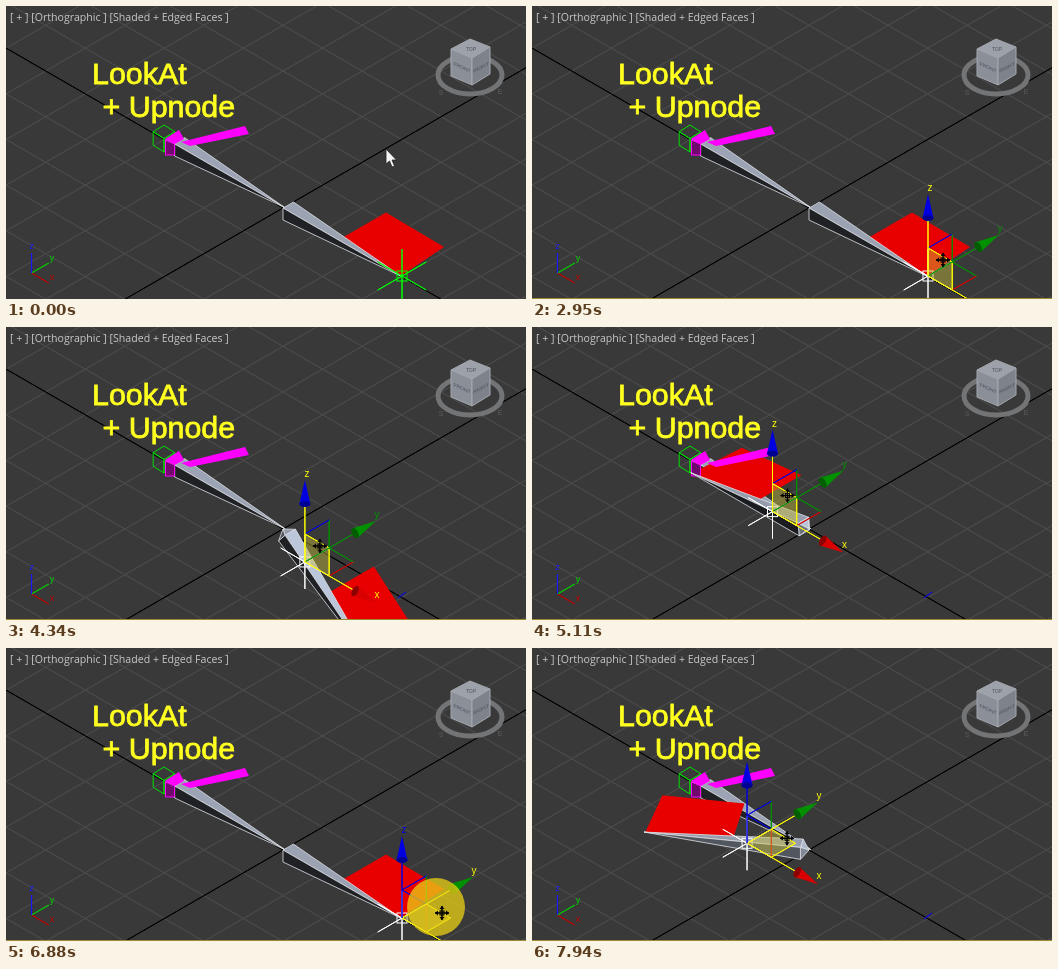
Write an HTML page with a canvas that moves like this. It is 520 px wide and 293 px high and loops after 8000 ms.

```html
<!DOCTYPE html>
<html lang="en">
<head>
<meta charset="utf-8">
<title>LookAt + Upnode</title>
<style>
html, body { margin: 0; width: 100%; height: 100%; overflow: hidden; background: #393939; }
canvas { display: block; }
</style>
</head>
<body>
<canvas id="view" width="520" height="293"></canvas>
<script>
const c = document.getElementById('view').getContext('2d');
const LOOP = 8000, LEN = 137, COS = Math.sqrt(3) / 2;
const ORIGIN = [277, 202], HOME = [396, 270];
const YELLOW = '#ff0', AXIS = { x: '#d80000', y: '#009000', z: '#0000e0' };

const ease = (t, from, to) => {
  const s = Math.min(1, Math.max(0, (t - from) / (to - from)));
  return s * s * (3 - 2 * s);
};
const lerp = (a, b, s) => a.map((k, i) => k + (b[i] - k) * s);
const shift = ([x, y], dx, dy) => [x + dx, y + dy];

// Isometric projection of a world vector placed at a screen point.
const iso = ([ox, oy], [x, y, z]) => [ox + (x + y) * COS, oy + (x - y) / 2 - z];
const sub = (a, b) => a.map((k, i) => k - b[i]);
const unit = v => { const m = Math.hypot(...v) || 1; return v.map(k => k / m); };
const cross = (a, b) => [a[1] * b[2] - a[2] * b[1], a[2] * b[0] - a[0] * b[2], a[0] * b[1] - a[1] * b[0]];
const mix = (f, u, v, w) => [0, 1, 2].map(k => f[0][k] * u + f[1][k] * v + f[2][k] * w);

function poly(pts, fill, stroke, width = 1) {
  c.beginPath();
  pts.forEach(p => c.lineTo(...p));
  c.closePath();
  if (fill) { c.fillStyle = fill; c.fill(); }
  if (stroke) { c.strokeStyle = stroke; c.lineWidth = width; c.stroke(); }
}
const line = (a, b, color, width) => poly([a, b], null, color, width);

function text(s, x, y, size, color, align = 'center', family = '"Liberation Sans", Arial') {
  c.font = `${size}px ${family}, sans-serif`;
  c.textAlign = align;
  c.fillStyle = color;
  c.fillText(s, x, y);
}

function title(s, x, y) {
  text(s, x, y, 30.4, '#ffff20', 'left');
  c.strokeStyle = '#ffff20';
  c.lineWidth = .8;
  c.strokeText(s, x, y);
}

function grid() {
  c.fillStyle = '#393939';
  c.fillRect(0, 0, 520, 293);
  const far = 700;
  const pair = (k, color) => {
    line(iso(ORIGIN, [-far, k, 0]), iso(ORIGIN, [far, k, 0]), color);
    line(iso(ORIGIN, [k, -far, 0]), iso(ORIGIN, [k, far, 0]), color);
  };
  for (let i = -12; i <= 12; i++) if (i) pair(i * LEN / 3, '#4a4a4a');
  pair(0, '#000');
}

// Axes of a bone: along, sideways (kept towards world Y), across.
function frame(dir) {
  const d = unit(dir), k = d[1];
  const side = unit([-d[0] * k, 1 - k * k, -d[2] * k]);
  return [d, side, cross(d, side)];
}

function bone(root, f, start) {
  const ring = [[-6, -6], [6, -6], [6, 6], [-6, 6]].map(([v, w]) => mix(f, start, v, w));
  for (const end of [0, LEN]) ring.forEach((p, i) => {
    const q = ring[(i + 1) % 4], apex = mix(f, end, 0, 0);
    let n = unit(cross(sub(q, p), sub(apex, p)));
    if (!end) n = n.map(k => -k);
    if (n[0] - n[1] + n[2] <= 0) return;
    const g = 28 + 130 * Math.max(0, n[2]) + 110 * Math.max(0, n[0]);
    poly([p, q, apex].map(v => iso(root, v)), `rgb(${g * .95},${g},${g * 1.1})`, '#dfe3e8', .8);
  });
}

function upPlane(f) {
  poly([[64, 0], [64, 55], [132, 54], [136, 0]].map(([u, v]) => iso(ORIGIN, mix(f, u, v, 0))), '#e80000');
}

function wireBox() {
  const hex = [...Array(6)].map((_, i) => [
    158 + 12.5 * Math.sin(i * Math.PI / 3), 132.5 - 13.5 * Math.cos(i * Math.PI / 3)]);
  poly(hex, null, '#00e000');
  [1, 3, 5].forEach(i => line(hex[i], [158, 132.5], '#00e000'));
}

function upNode() {
  poly([[175, 136], [239, 120], [243, 128], [184, 140]], '#f0f');
  poly([[159, 133], [173, 124], [178, 133], [169, 138]], '#f0f');
  poly([[159.5, 134], [168.5, 138], [168.5, 149], [159.5, 149]], '#70086e', '#f0f');
}

function helper(g, color) {
  for (const v of [[28, 0, 0], [0, 28, 0], [0, 0, 27]])
    line(iso(g, v), iso(g, v.map(k => -k)), color);
  c.strokeRect(g[0] - 5, g[1] - 5, 10, 10);
}

function cone(g, dir, color) {
  const tip = iso(g, dir.map(k => k * 82)), base = iso(g, dir.map(k => k * 58));
  const dx = (tip[0] - base[0]) / 24, dy = (tip[1] - base[1]) / 24;
  poly([tip, shift(base, -dy * 5.5, dx * 5.5), shift(base, dy * 5.5, -dx * 5.5)], color);
  c.beginPath();
  c.ellipse(...base, 3, 5.5, Math.atan2(dy, dx), 0, 7);
  c.fill();
  c.fillStyle = 'rgba(0,0,0,.35)';
  c.fill();
}

function gizmo(g, hot) {
  const S = 28, dirs = { x: [1, 0, 0], y: [0, 1, 0], z: [0, 0, 1] };
  const labels = { x: [72, 36], y: [72, -44], z: [2, -85] };
  for (const [a, b] of ['yz', 'xz', 'xy']) {
    const on = hot === a + b;
    const pa = iso(g, dirs[a].map(k => k * S)), pb = iso(g, dirs[b].map(k => k * S));
    const far = iso(pa, dirs[b].map(k => k * S));
    if (on) poly([g, pa, far, pb], 'rgba(200,190,60,.45)');
    line(pa, far, on ? YELLOW : AXIS[a]);
    line(pb, far, on ? YELLOW : AXIS[b]);
  }
  for (const k of 'yxz') {
    const color = hot.includes(k) ? YELLOW : AXIS[k];
    line(g, iso(g, dirs[k].map(v => v * 60)), color);
    cone(g, dirs[k], AXIS[k]);
    text(k, ...shift(g, ...labels[k]), 10, color);
  }
}

function viewCube() {
  c.strokeStyle = '#737476';
  c.lineWidth = 5;
  c.beginPath();
  c.ellipse(464, 69, 32, 19, 0, 0, 7);
  c.stroke();
  const top = [[445, 43], [464, 33], [484, 41], [466, 52]], [left, , right, front] = top;
  const side = (a, b, color) => poly([a, b, shift(b, 0, 27), shift(a, 0, 27)], color, '#a4a8ae');
  poly(top, '#9da1a9', '#a4a8ae');
  side(left, front, '#8a8f98');
  side(front, right, '#7d828b');
  const face = (s, x, y, skew) => {
    c.save();
    c.transform(1, skew, 0, 1, x, y);
    text(s, 0, 0, 5, '#4c5058');
    c.restore();
  };
  face('TOP', 465, 45, 0);
  face('FRONT', 456, 63, .45);
  face('RIGHT', 475, 63, -.5);
  text('S', 435, 89, 7, '#5c5c5c');
  text('E', 494, 88, 7, '#5c5c5c');
}

function tripod() {
  const o = [25.5, 267];
  const dirs = { x: [20, 0, 0], y: [0, 20, 0], z: [0, 0, 20] };
  const colors = { x: '#c00000', y: '#00d000', z: '#1818ff' };
  for (const k in dirs) {
    line(o, iso(o, dirs[k]), colors[k], 1.2);
    text(k, ...shift(iso(o, dirs[k].map(v => v * 1.18)), 0, k === 'x' ? -5 : 0), 9, colors[k]);
  }
}

function pointer([x, y], kind) {
  const place = pts => pts.map(p => shift(p, x, y));
  if (kind === 'arrow') {
    poly(place([[0, 0], [0, 15], [3.5, 12], [6, 18], [8.5, 17], [6, 11], [10.5, 11]]), '#f4f4f4', '#222', .8);
    return;
  }
  for (const [u, v] of [[1, 0], [-1, 0], [0, 1], [0, -1]]) {
    line([x, y], [x + 7 * u, y + 7 * v], '#000', kind === 'pick' ? 2 : 1);
    if (kind === 'pick') line([x, y], [x + 6 * u, y + 6 * v], '#aaa', .6);
    else poly(place([[7 * u, 7 * v], [4 * u - 2.5 * v, 4 * v + 2.5 * u], [4 * u + 2.5 * v, 4 * v - 2.5 * u]]), '#000');
  }
  if (kind === 'move') {
    c.strokeStyle = '#000';
    c.strokeRect(x - 2, y - 2, 4, 4);
  }
}

// Two rounds about the joint, the second one faster, then a stop to the right.
function circling(t) {
  const turn = (82 - (t - 4340) * (t < 4340 ? .25 : .34)) * Math.PI / 180;
  const round = [291.5 + 51 * Math.cos(turn), 184.5 + 51 * Math.sin(turn)];
  return lerp(lerp(HOME, round, ease(t, 2980, 3350)), [336, 234], ease(t, 5340, 5620));
}

// One swing below the joint to its left side.
function swing(t) {
  const s = ease(t, 6920, 7960), bend = [240, 330];
  return lerp(lerp(HOME, bend, s), lerp(bend, [215, 195], s), s);
}

function wander(t) {
  let p = lerp([380, 143], [417, 283], ease(t, 70, 780));
  p = lerp(p, [486, 178], ease(t, 1360, 2100));
  return lerp(p, [411, 254], ease(t, 2210, 2930));
}

function state(t) {
  let goal = HOME, world = [1, 0, 0], cursor;
  const flat = () => [(goal[0] - ORIGIN[0]) / COS, goal[1] - ORIGIN[1]];
  if (t < 2980) cursor = wander(t);
  else if (t < 5870) {
    goal = circling(t);
    cursor = shift(goal, 15, -16);
    const [x, y] = flat();
    world = [x, 0, x / 2 - y];
  } else if (t < 6920) cursor = lerp([351, 218], [436, 265], ease(t, 5870, 6600));
  else {
    goal = swing(t);
    cursor = shift(goal, 40, -5);
    const [x, y] = flat();
    world = [x / 2 + y, x / 2 - y, 0];
  }
  const hot = t > 2780 && t < 5870 ? 'xz' : t > 6480 ? 'xy' : '';
  const kind = hot ? 'move' : t > 720 && t < 1400 ? 'pick' : 'arrow';
  return { goal, world, cursor, hot, kind, picked: t >= 1150 };
}

function draw(t) {
  const s = state(t), f = frame(s.world);
  grid();
  wireBox();
  bone([160, 133], frame([1, 0, 0]), 16);
  upPlane(f);
  upNode();
  bone(ORIGIN, f, 6);
  if (s.goal !== HOME) line([392, 271], [400, 265], '#1010d0', 1.3);
  helper(s.goal, s.picked ? '#fff' : '#0f0');
  if (s.picked) gizmo(s.goal, s.hot);
  text('[ + ] [Orthographic ] [Shaded + Edged Faces ]', 4, 15, 10.6, '#c8c8c8', 'left', '"Open Sans"');
  title('LookAt', 86, 78);
  title('+ Upnode', 96.5, 111);
  viewCube();
  tripod();
  if (t > 720) line([0, 292.5], [520, 292.5], '#a08a30');
  if ([1040, 3000, 6800].some(k => t >= k && t < k + 140)) {
    c.fillStyle = 'rgba(235,210,20,.75)';
    c.beginPath();
    c.arc(...shift(s.cursor, -6, -6), 29, 0, 7);
    c.fill();
  }
  pointer(s.cursor, s.kind);
}

function tick(now) {
  draw(now % LOOP);
  requestAnimationFrame(tick);
}
requestAnimationFrame(tick);
</script>
</body>
</html>
```
